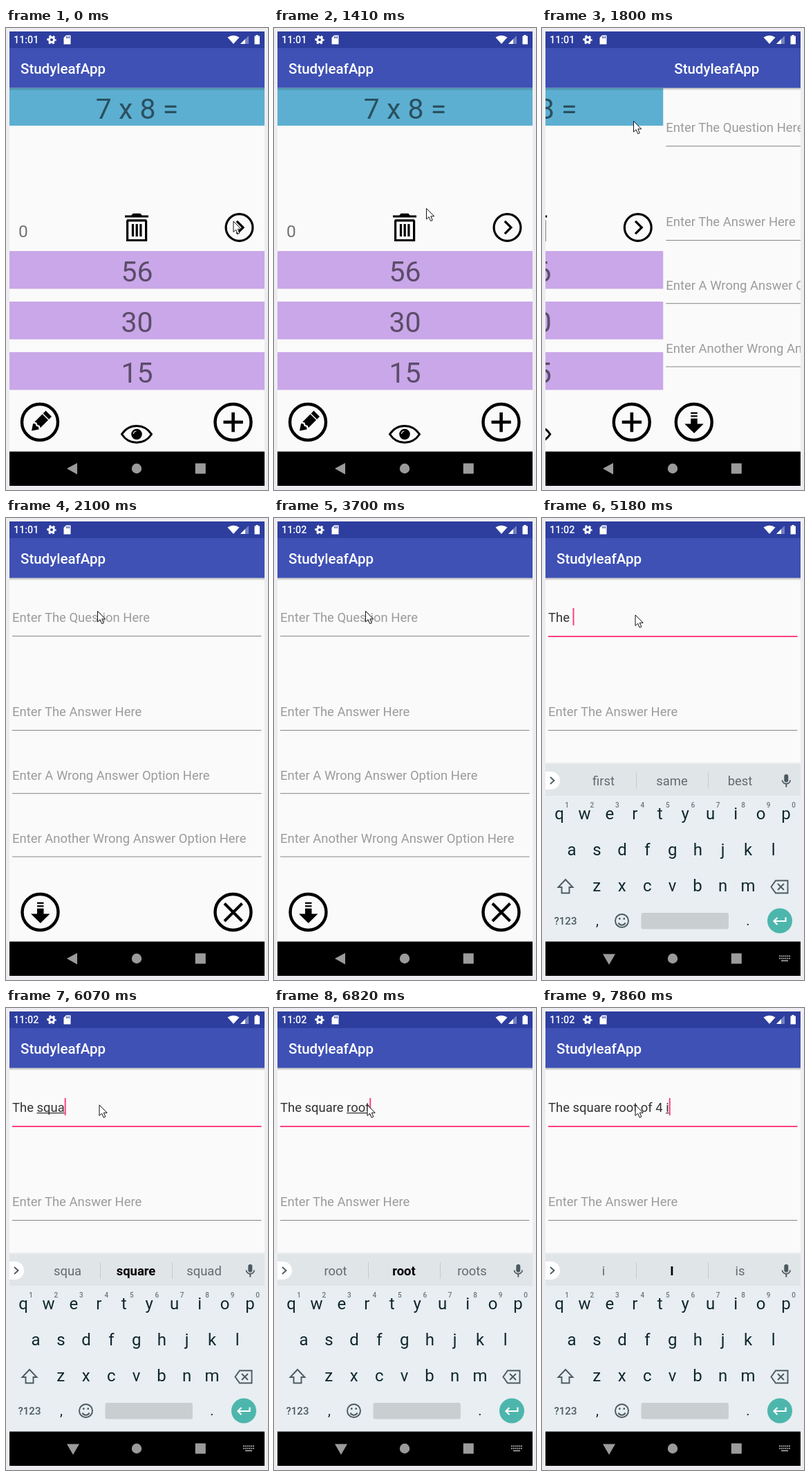
Recreate the animation shown at these times as an HTML page. Size 379x667 px, loop 8 s.

```html
<!DOCTYPE html>
<html lang="en">
<head>
<meta charset="utf-8">
<title>Flashcards</title>
<style>
  html, body { margin: 0; width: 100%; height: 100%; overflow: hidden; background: #ededf1; }
  svg { display: block; width: 379px; height: 667px; font-family: Roboto, sans-serif; }
  text { white-space: pre; }
  .mid { text-anchor: middle; }
  .title { font-size: 20.5px; font-weight: 500; fill: #fff; }
  .card { font-size: 41px; fill: rgba(0,0,0,.54); text-anchor: middle; }
  .field { font-size: 18.45px; fill: rgba(0,0,0,.38); }
  .key { font-size: 24px; fill: #10272f; text-anchor: middle; }
  .digit { font-size: 10px; font-weight: 500; fill: #6c777c; text-anchor: middle; }
  .word { font-size: 18.45px; fill: #626b6f; text-anchor: middle; }
  .word.best { font-weight: 700; fill: #000; }
  .line { fill: none; stroke: #000; }
  .icon { fill: none; stroke: #4b5a61; stroke-width: 1.9; }
</style>
</head>
<body>
<svg viewBox="0 0 379 667">
  <defs>
    <clipPath id="screen"><path d="M5 5H374V612H5Z"/></clipPath>
    <linearGradient id="shade" x2="0" y2="1">
      <stop stop-opacity=".24"/><stop offset="1" stop-opacity="0"/>
    </linearGradient>
    <circle id="ring" class="line" r="26" stroke-width="4.4"/>
  </defs>

  <g clip-path="url(#screen)">
    <path fill="#fafafa" d="M5 86H374V612H5Z"/>
    <path fill="#3f51b5" d="M5 29H374V86.5H5Z"/>

    <g id="quiz">
      <text class="title" x="21" y="66">StudyleafApp</text>
      <path fill="#5cafd1" d="M5 86.5H374V141H5Z"/>
      <path fill="#c9a7e8" d="M5 322H374V376.500H5ZM5 395H374V449.500H5ZM5 468H374V522.500H5Z"/>
      <text class="card" x="189.500" y="130.500">7 x 8 =</text>
      <text class="card" x="189.500" y="366">56</text>
      <text class="card" x="189.500" y="438.700">30</text>
      <text class="card" x="189.500" y="511.700">15</text>
      <text x="18" y="302" font-size="24.6" fill="rgba(0,0,0,.54)">0</text>

      <g class="line" stroke-width="3.2">
        <path d="M172 272H206M175.600 277.500V306.500H202.600V277.500"/>
        <path d="M175 277.800H203M183.500 283V301M189.200 283V301M194.900 283V301"/>
        <path d="M182 271L184 268.500H194L196 271Z" fill="#000" stroke-width="1.500"/>
        <circle cx="337.500" cy="288" r="19.400"/>
        <path d="M333.800 278.800L343 288L333.800 297.200"/>
      </g>

      <use href="#ring" x="49" y="569"/>
      <g transform="translate(37 581.500) rotate(-45)">
        <path d="M0 0L9 -6L11 -3L9.500 0L11 3L9 6ZM12 -6H28V6H12L13.500 3L12 0L13.500 -3ZM29.500 -6H35V6H29.500Z"/>
      </g>
      <use href="#ring" x="328.500" y="569"/>
      <path class="line" stroke-width="4.600" d="M314.500 569H342.800M328.600 555V583.300"/>
      <path class="line" stroke-width="3" d="M167.500 586.500C178 570.500 200 570.500 210.500 586.500C200 602.500 178 602.500 167.500 586.500Z"/>
      <circle cx="189" cy="586.500" r="7.800"/>
      <path fill="none" stroke="#fafafa" stroke-width="1.200" d="M184.500 586A4.500 4.500 0 0 1 188.500 582"/>
    </g>

    <g id="form">
      <text class="title" x="21" y="66">StudyleafApp</text>
      <text class="field" x="9" y="150" id="question"></text>
      <path fill="#333" id="underline"/>
      <path fill="#ff4081" id="caret"/>
      <text class="field" x="9" y="286">Enter The Answer Here</text>
      <text class="field" x="9" y="377.500">Enter A Wrong Answer Option Here</text>
      <text class="field" x="9" y="468.700">Enter Another Wrong Answer Option Here</text>
      <path stroke="#868686" d="M9 306.500H369.500M9 397.700H369.500M9 489H369.500"/>
      <path id="rule"/>
      <use href="#ring" x="49.500" y="569"/>
      <path d="M45 554.800H54.500V557H45ZM45 559.200H54.500V561.400H45ZM45 563.800H54.500V571.500H63.500L49.800 585L36 571.500H45Z"/>
      <use href="#ring" x="328.500" y="569"/>
      <path class="line" stroke-width="4" d="M316 556.500L341.500 582M341.500 556.500L316 582"/>
    </g>
    <path fill="url(#shade)" d="M5 86.500H374V90.500H5Z"/>

    <g id="keyboard">
      <path fill="#e8eef1" d="M5 355H374V612H5Z"/>
      <path fill="#e0e5e8" d="M5 355H374V401H5Z"/>
      <path fill="#000" opacity=".05" d="M5 353H374V355H5Z"/>
      <path fill="#fff" d="M5 366H13A13 13 0 0 1 13 392H5Z"/>
      <path class="icon" stroke-width="2.200" d="M12 374L17.500 379L12 384"/>
      <path stroke="#c6cccf" d="M136.500 367V391M240.500 367V391"/>
      <text class="word" x="89" y="386"></text>
      <text class="word" x="188" y="386"></text>
      <text class="word" x="286.500" y="386"></text>
      <rect x="350.300" y="370" width="6" height="11.500" rx="3" fill="#4b5a61"/>
      <path class="icon" stroke-width="1.700" d="M347.500 378.500A5.900 5.900 0 0 0 359.200 378.500M353.300 384V388.500"/>
      <g id="keys"></g>
      <path class="icon" d="M34 522L44.500 533H39.500V541.500H28.500V533H23.500Z"/>
      <path class="icon" d="M338 523.500H355.500V541.500H338L331.500 532.500ZM341 528L350 537M350 528L341 537"/>
      <text class="mid" x="34" y="587" font-size="15" font-weight="500" fill="#4b5a61">?123</text>
      <text class="key" x="80" y="588" style="font-size:20px">,</text>
      <text class="key" x="298" y="588" style="font-size:20px">.</text>
      <g class="icon">
        <circle cx="115.500" cy="581.500" r="9.500"/>
        <path d="M110.500 584.500A5.500 5.500 0 0 0 120.500 584.500"/>
        <path d="M111 578.500H113.500M117.500 578.500H120" stroke-width="2.600"/>
      </g>
      <rect x="143.500" y="570" width="126.500" height="23.500" rx="3" fill="#c9ced0"/>
      <circle cx="344" cy="581.500" r="18" fill="#4db6ac"/>
      <path fill="none" stroke="#fff" stroke-width="2.200" d="M352.500 576.500V582H336M340.500 577L335.500 582L340.500 587"/>
    </g>
  </g>

  <path fill="#2d3e9f" d="M5 5H374V29H5Z"/>
  <text id="clock" x="11" y="22" font-size="14.350" font-weight="500" fill="#fff"></text>
  <g fill="#fff">
    <circle cx="66" cy="17" r="3.600" fill="none" stroke="#fff" stroke-width="3"/>
    <circle cx="66" cy="17" r="5.600" fill="none" stroke="#fff" stroke-width="2.200" stroke-dasharray="2.930" stroke-dashoffset="1.500"/>
    <path d="M87 10.500H93.500V23.500H83.500V14Z"/>
    <path stroke="#2d3e9f" stroke-width="1" d="M87.500 12V15M89.500 12V15M91.500 12V15"/>
    <path d="M320.500 13.500Q329 8 337.500 13.500L329 23Z"/>
    <path opacity=".35" d="M351 11V23H339Z"/>
    <path d="M346 16V23H339Z"/>
    <path d="M361.500 10H364.500V11.500H367V23.500H359.500V11.500H361.500Z"/>
  </g>

  <path d="M5 611.500H374V661H5Z"/>
  <g fill="#9b9b9b">
    <path id="back"/>
    <circle cx="189" cy="636" r="7.200"/>
    <path d="M273.800 628.500H288.800V643.500H273.800Z"/>
    <g id="switcher" fill="none" stroke="#9b9b9b" stroke-width="1.800">
      <path d="M343 632.500H359M343 635.800H359" stroke-dasharray="2 .8"/>
      <path d="M346 639.200H356"/>
    </g>
  </g>

  <path id="pointer" fill="#fff" stroke="#111" stroke-width="1" stroke-linejoin="round"
        d="M0 0V15.500L3.600 12.200L6.200 18.200L8.800 17.100L6.300 11.300H11.200Z"/>
</svg>

<script>
const LOOP = 8000;
const $ = id => document.getElementById(id);
const words = document.querySelectorAll('.word');
const pen = document.createElement('canvas').getContext('2d');
const measure = s => {
  pen.font = '18.45px Roboto, sans-serif';
  return pen.measureText(s).width;
};

// Each entry: start time, then its values, held until the next entry.
const pointerPath = [
  [0, 329, 279], [500, 331, 330], [650, 330, 420], [800, 327, 515],
  [950, 325, 562], [1100, 322, 558], [1260, 285, 420], [1410, 220.5, 260.5],
  [1540, 165, 178], [1680, 132.5, 134.5], [3860, 134, 138], [4010, 135, 140]
];
const slideTimes = [0, 1540, 1680, 1800, 1950, 2100].map(t => [t]);
const keyboardDrop = [[0, 300], [4160, 150], [4310, 25], [4450, 0]];
// Typed text, start of the underlined word (-1: none), suggestions.
const typing = [
  [0, '', -1, 'what I thanks'],
  [4880, 'Th', 0, 'Th The This'],
  [5030, 'The', 0, 'The There Then'],
  [5180, 'The ', -1, 'first same best'],
  [5610, 'The s', 4, 's so same'],
  [5760, 'The sq', 4, 'sq sq square'],
  [5910, 'The squ', 4, 'squ squad square'],
  [6070, 'The squa', 4, 'squa square squad'],
  [6220, 'The squar', 4, 'squar square squares'],
  [6370, 'The square', 4, 'square square squares'],
  [6520, 'The square ', -1, 'and is root'],
  [6670, 'The square ro', 11, 'ro to room'],
  [6820, 'The square root', 11, 'root root roots'],
  [6960, 'The square root o', 16, 'o of on'],
  [7100, 'The square root of', 16, 'of of if'],
  [7710, 'The square root of 4 ', -1, 'to is in'],
  [7860, 'The square root of 4 i', 21, 'i I is']
];
const at = (track, t) => track.findLast(entry => entry[0] <= t);

function buildKeys() {
  const rows = [['qwertyuiop', 25, 435], ['asdfghjkl', 43, 487], ['zxcvbnm', 79.3, 538.5]];
  const label = (cls, x, y, s) => `<text class="${cls}" x="${x}" y="${y}">${s}</text>`;
  $('keys').innerHTML = rows.map(([letters, x, y], row) => [...letters].map((c, i) => {
    const cx = x + i * 36.45;
    return label('key', cx, y, c) + (row ? '' : label('digit', cx + 11, 418, (i + 1) % 10));
  }).join('')).join('');
}

function drawField(t) {
  const [, typed, start, hints] = at(typing, t);
  const focused = t >= 4010;
  const end = 9 + measure(typed);
  $('question').textContent = typed || 'Enter The Question Here';
  $('question').style.fill = typed ? 'rgba(0,0,0,.8)' : '';
  $('underline').setAttribute('d',
    start < 0 ? '' : `M${9 + measure(typed.slice(0, start))} 151H${end}V152.200H0Z`.replace('H0Z', `H${9 + measure(typed.slice(0, start))}Z`));
  $('caret').setAttribute('d', focused ? `M${end} 130H${end + 2}V155H${end}Z` : '');
  $('rule').setAttribute('d', focused ? 'M9 171H369.500' : 'M9 170.500H369.500');
  $('rule').setAttribute('stroke', focused ? '#ff4081' : '#868686');
  $('rule').setAttribute('stroke-width', focused ? 2 : 1);
  hints.split(' ').forEach((hint, i) => words[i].textContent = hint);
  words[1].classList.toggle('best', start >= 0);
}

function draw(t) {
  const phase = Math.min(1, Math.max(0, (at(slideTimes, t)[0] - 1480) / 610));
  const shift = 369 * (0.5 - 0.5 * Math.cos(Math.PI * phase));
  $('quiz').setAttribute('transform', `translate(${-shift})`);
  $('form').setAttribute('transform', `translate(${369 - shift})`);

  const [, x, y] = at(pointerPath, t);
  $('pointer').setAttribute('transform', `translate(${x} ${y})`);

  const open = t >= 4160;
  $('keyboard').setAttribute('transform', `translate(0 ${at(keyboardDrop, t)[1]})`);
  $('back').setAttribute('d', open ? 'M88 629.500H106L97 645Z' : 'M88 636L103 628V644.500Z');
  $('switcher').style.display = open ? '' : 'none';
  $('clock').textContent = t < 3700 ? '11:01' : '11:02';
  drawField(t);
}

const origin = performance.now();
function tick() {
  draw((performance.now() - origin) % LOOP);
  requestAnimationFrame(tick);
}
buildKeys();
tick();
</script>
</body>
</html>
```
